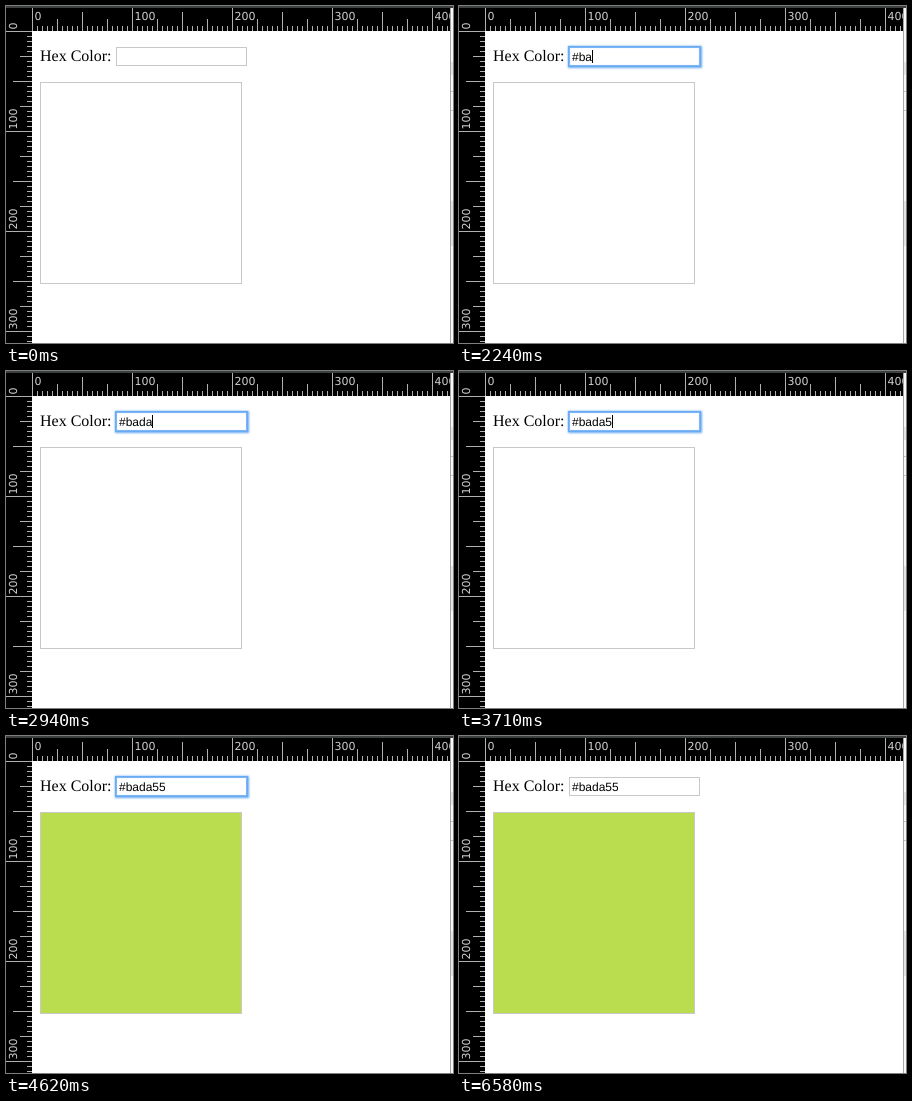
An HTML page for the animation above (6.65 s loop, 447 by 337 pixels).

```html
<!DOCTYPE html>
<html lang="en">
<head>
<meta charset="utf-8">
<title>Hex Color</title>
<style>
  html, body { margin: 0; width: 100%; height: 100%; overflow: hidden; background: #fff; }
  #stage { position: relative; width: 447px; height: 337px; overflow: hidden; }
  #stage > * { position: absolute; box-sizing: border-box; }
  svg { left: 0; top: 0; }
  text { text-rendering: geometricPrecision; }
  .label { font: 16px "Liberation Serif", serif; fill: #000; }
  .mark { font: 11px "DejaVu Sans", sans-serif; fill: #d0d0d0; }

  .field {
    left: 110px; top: 41px; width: 131px; height: 19px;
    border: 1px solid #c8c8c8;
    animation: focus 6650ms step-end infinite;
  }
  #stage > .typed {
    left: 113px; top: 44px; height: 13px;
    box-sizing: content-box; overflow: hidden; white-space: nowrap;
    border-right: 1px solid transparent;
    font: 12px/14px "Liberation Sans", Arial, sans-serif;
    text-rendering: geometricPrecision;
    animation: type 6650ms step-end infinite;
  }
  .swatch {
    left: 34px; top: 76px; width: 202px; height: 202px;
    border: 1px solid #c8c8c8;
    animation: fill 6650ms step-end infinite;
  }

  @keyframes focus {
    0%, 98.947% { border-color: #c8c8c8; box-shadow: none; }
    8.421% {
      border-color: #7db6f4;
      box-shadow: 0 0 0 1px #69aaf3, 0 0 2px 1.5px #69aaf3, inset 0 0 1px #a9cff8;
    }
    100% { border-color: #c8c8c8; box-shadow: none; }
  }
  @keyframes type {
    0%      { width: 0; border-color: transparent; }
    8.421%  { width: 0; border-color: #000; }
    15.789% { width: 0; border-color: transparent; }
    18.947% { width: 7px; border-color: #000; }
    27.368% { width: 7px; border-color: transparent; }
    30.526% { width: 13px; border-color: #000; }
    33.684% { width: 20px; border-color: #000; }
    36.842% { width: 27px; border-color: #000; }
    44.210% { width: 33px; border-color: #000; }
    51.578% { width: 33px; border-color: transparent; }
    55.789% { width: 40px; border-color: #000; }
    61.052%, 76.842%, 92.631% { width: 46px; border-color: #000; }
    69.473%, 85.263%, 98.947%, 100% { width: 46px; border-color: transparent; }
  }
  @keyframes fill {
    0%, 44.210% { background: #fff; }
    36.842% { background: #bca8df; }
    61.052%, 100% { background: #b9dd4e; }
  }
</style>
</head>
<body>
<div id="stage">
  <svg width="447" height="337" shape-rendering="crispEdges">
    <path d="M0 0H445V25H26V337H0Z" fill="#000"/>
    <path d="M0 0H447V2H0Z" fill="#3c403e"/>
    <path id="ticks" fill="#b0b0b0"/>
    <g id="marks"></g>
    <path d="M445 2H447V337H445Z" fill="#f8f8f8"/>
    <path d="M445 56H447V69H445ZM445 195H447V240H445Z" fill="#e4e4e4"/>
    <path d="M445 85H447V86H445ZM445 104H447V105H445Z" fill="#c4c4c4"/>
    <path d="M444 2H445V337H444Z" fill="#a6a6a6"/>
    <text class="label" x="34" y="55">Hex Color:</text>
  </svg>
  <div class="field"></div>
  <div class="typed">#bada55</div>
  <div class="swatch"></div>
</div>
<script>
  const left = 26, top0 = 25;
  const size = (n, full) => n % 100 === 0 ? full : n % 50 === 0 ? 19 : n % 25 === 0 ? 12 : 5;
  const rect = (x, y, w, h) => `M${x} ${y}h${w}v${h}h${-w}z`;
  const mark = (place, n) => `<text class="mark" transform="${place}">${n}</text>`;
  let ticks = '', marks = '';

  for (let n = 0; n < 419; n += 5) {
    const h = size(n, 23), w = size(n, left);
    ticks += rect(left + n, top0 - h, 1, h);
    if (n < 312) ticks += rect(left - w, top0 + n, w, 1);
    if (n % 100 === 0) {
      marks += mark(`translate(${left + n + 2.5} 14)`, n);
      if (n < 312) marks += mark(`translate(11 ${top0 + n - 1.5}) rotate(-90)`, n);
    }
  }
  document.getElementById('ticks').setAttribute('d', ticks);
  document.getElementById('marks').innerHTML = marks;
</script>
</body>
</html>
```
